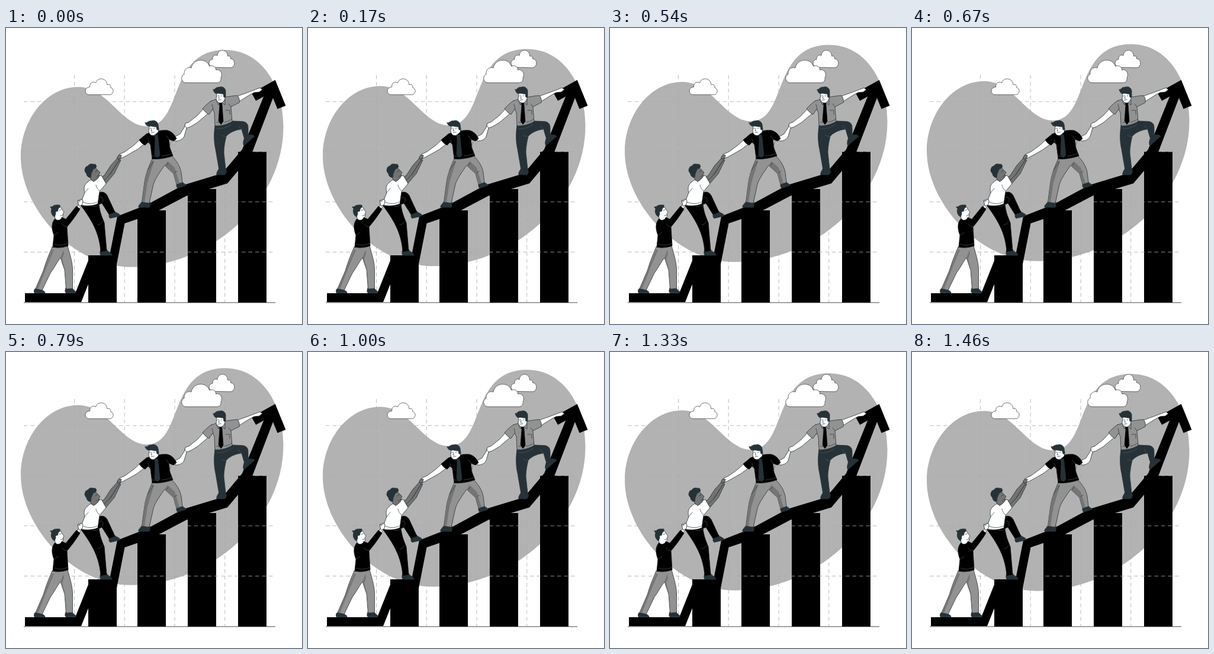
These frames come from a looping animation (500 by 500 pixels, 1500 ms). An HTML page:

```html
<!DOCTYPE html>
<html lang="en">
<head>
<meta charset="utf-8">
<title>Climbing the growth chart</title>
<style>
html, body { margin: 0; width: 100%; height: 100%; overflow: hidden; background: #fff; }
svg { display: block; width: 100vw; height: 100vh; }
.person path { stroke: #263238; stroke-width: .8; stroke-linejoin: round; stroke-linecap: round; }
.person .skin { fill: #fff; }
.person .tan { fill: #737373; }
.person .black { fill: #000; stroke: #111; }
.person .gray { fill: #929292; }
.person .shade { fill: #757575; stroke: none; }
.person .navy { fill: #263238; }
.person .line { fill: none; stroke-width: .7; }
.person .fold { fill: none; stroke: #596268; stroke-width: .6; }
.cloud path { fill: #fff; stroke: #333; stroke-width: .7; }
.grid { fill: none; stroke: #aaa; stroke-width: .8; stroke-dasharray: 6.5 5; }
.head { fill: none; stroke: #000; stroke-width: 15; stroke-miterlimit: 8; }
</style>
</head>
<body>
<svg viewBox="0 0 500 500" xmlns="http://www.w3.org/2000/svg">
  <path id="blob" fill="#b2b2b2" d="M25 215C26 155 68 99.500 122 99.500C172 99.500 195 166 238 166C300 166 272 37 370 37C430 37 468 95 468.500 165C470 294 345 403.700 212 403.700C110 403.700 23 300 25 215Z"/>

  <!-- chart -->
  <path d="M139 384H187V464H139ZM222 308H270V464H222ZM307 272H355V464H307ZM392 209H440V464H392Z"/>
  <path class="grid" d="M30 124.300H455M30 209H455M30 293.700H455M30 378.500H455M115.500 79.500V463M200.200 79.500V463M285 79.500V463M369.700 79.500V463"/>
  <path d="M30 463.900H455" stroke="#333" stroke-width=".9"/>
  <path d="M32 448H117L142.500 384H175L188 318L238 298.500L299 265.500L365 245.500L399 205L442 99L456 105L414 215L374 262.500L305 283.500L246 314.500L200.500 330L187 399H152.500L127 463H32Z"/>
  <path class="head" d="M418.500 116.500L451 98.500L465.500 134"/>

  <g class="cloud">
    <path d="M350 66.500C341 65 341 54 349 53C348 48 353 44 357 46.500C358 34.500 374 34.500 374.500 47.500C378 46.500 380 49 379.500 52C388 52 388 67 379 67Z"/>
    <path d="M303 92.500C295 91 295 80 301 78C300 70 307 65 313 67.500C316 51 339 50 343.500 64.500C350 62 355 66 354.500 71C362 68 367 78 363 84C364 90 360 92.500 356 92.500Z"/>
    <path transform="translate(.7 .7)" d="M140 112C131 112 131 99 141 99C140 92 146 89 151 92C153 82 170 83 170 95C175 94 177 97 176 100C182 101 182 111 175 112Z"/>
  </g>

  <!-- lowest climber -->
  <g class="person">
    <path class="navy" d="M50 440C47 441 47 445 48 447.500H66C66 444 61 444 60 441Z"/>
    <path class="navy" d="M101 439C100 442 99 445 101 447.500H118C119 444 113 443 112 439Z"/>
    <path class="gray" d="M78 370L104 368C108 382 112 395 112.500 407L112.500 440L101.500 441L99 409L92 388C86 396 81 406 75 414L61 443L50 440L63 410C67 397 72 383 78 370Z"/>
    <path class="shade" d="M92 388L97 375L98 381L95 390L100 409L102 439L99 409Z"/>
    <path class="shade" d="M78 374L81 375L69 403L54 441L50 440L63 410Z"/>
    <path class="skin" d="M119 304L123 297L121 292C123 289 125 291 126 293L129 288C131 289 130 294 130 297L123 306Z"/>
    <path class="black" d="M83 322C87 318 94 319 101 323L119 301L125 306C118 317 110 328 103 336L105 368C96 371 87 372 79 370L81 350C77 340 76 329 83 322Z"/>
    <path class="fold" d="M103 335C99 336 97 334 95 331M82 350L88 345M82 365C90 368 97 367 104 364"/>
    <path class="skin" d="M82 313L83 322C87 327 93 324 94 320C97 320 97 317 96 314L98 311L95 307L92 302H85Z"/>
    <path class="navy" d="M75 302L78 302C81 298 87 299 91 299L91 303C88 304 88 307 87 310C85 309 83 310 84 314L82 319C77 317 75 309 77 306Z"/>
    <path class="line" d="M90 308L93 307M92 317L96 316"/>
  </g>

  <!-- second climber -->
  <g class="person">
    <path class="navy" d="M160 375C158 378 159 382 160 384H179C179 379 172 379 170 374Z"/>
    <path class="navy" d="M175 313C173 317 174 320 176 321.500C182 320 188 319 193 317C192 313 186 313 183 309Z"/>
    <path class="black" d="M133 296L154 281C159 275 167 276 171 283L184 311L174 315L162 296L153 300Z"/>
    <path class="black" d="M126 299L157 297C158 310 162 319 166 329L170 376L160 378C158 345 143 322 126 299Z"/>
    <path class="fold" d="M157 298C153 302 149 302 145 301M158 286C163 284 166 289 163 294M155 332C158 333 161 330 163 327"/>
    <path class="tan" d="M158 254L166 249L177 232L187 221L190 216L195 213L195 219L190 225L181 239L168 258L162 263Z"/>
    <path class="tan" d="M161 262L176 247L190 225L194 223L183 246L165 267Z"/>
    <path class="skin" d="M137 261C142 256 149 253 157 250L161 249L169 263L164 269L158 276L155 297C146 301 135 301 125 299L133 278C131 271 132 265 137 261Z"/>
    <path class="line" d="M145 255L148 260L156 253M158 275C155 273 152 268 152 265M133 278L139 271M130 294C139 298 148 297 154 294"/>
    <path class="tan" d="M141 248L144 257C149 260 153 257 154 254C157 253 158 250 157 247L159 244L155 240L151 236L143 240Z"/>
    <path class="navy" d="M134 237C134 233 139 234 140 231C144 228 148 231 151 230L153 234C152 237 149 237 147 239L145 244L144 246L143 253C138 252 136 249 136 246C133 243 132 240 134 237Z"/>
    <path class="line" d="M151 243L154 241M153 251L157 249"/>
    <path class="skin" d="M122 296L121.500 291L124.500 293L126 289L130 291L129 298L124 301Z"/>
  </g>

  <!-- third climber -->
  <g class="person">
    <path class="navy" d="M230 293C227 297 223 300 224 303H242C244 301 243 297 243 294Z"/>
    <path class="navy" d="M289 261C287 265 288 269 290 270.500L304 266C304 263 299 263 297 259Z"/>
    <path class="gray" d="M247 221L280 216C288 224 294 233 296 244L298 261L288 264L283 246L268 232C261 242 252 254 249 264L242 296L229.500 294L234 260C236 246 242 232 247 221Z"/>
    <path class="shade" d="M247 224L250 225L239 261L234 294L230 294L234 260C236 246 242 232 247 224Z"/>
    <path class="shade" d="M268 232L273 225L285 236L293 262L288 264L283 246Z"/>
    <path class="line" d="M249 225C246 232 242 235 239 240M271 232L274 228M285 244L289 242"/>
    <path class="skin" d="M228 187L216 198L201 209L192 213L189 217L191 221L197 219L208 213L222 205L235 195Z"/>
    <path class="skin" d="M283 185L294 179L301 168L303 162L308 160L309 165L305 169L301 183C299 188 293 191 287 191Z"/>
    <path class="black" d="M237 179C246 175 263 172 273 173C280 175 285 180 288 187L283 191L275 188L277 203L282 216C270 220 259 222 247 221L244 197L240 193L235 198C230 196 227 192 225 189C229 186 233 182 237 179Z"/>
    <path class="navy" d="M251 181L256 180L257 186L260 215L256 219L251 214L252 187Z"/>
    <path class="fold" d="M243 196L240 188M276 189L271 182M247 216L254 217M263 216C270 216 275 214 280 212M279 191L276 201"/>
    <path class="skin" d="M242 166L241 174C242 180 246 183 251 181L257 176L258 169L254 164H244Z"/>
    <path class="navy" d="M235 160C239 161 241 156 246 157C250 155 256 158 257 163L258 172L255 172L254 167C250 167 246 165 242 166C238 166 236 163 235 160Z"/>
    <path class="line" d="M243 170L245 169M249 170L251 169M246 170L245 174L247 174M245 177L250 176"/>
    <path class="tan" d="M188 218L191 214L195 215L194 219L190 222Z"/>
  </g>

  <!-- top climber -->
  <g class="person">
    <path class="navy" d="M360 237C358 241 355 244 356 248H369C373 246 373 242 371 237Z"/>
    <path class="navy" d="M404 181C402 188 399 195 402 199C408 193 414 188 420 183C418 179 411 182 408 179Z"/>
    <path class="navy" d="M353 165L381 157L401 158C408 160 409 164 409 169L409 183L402 185L398 171C388 172 378 176 372 183C369 195 368 204 368 211L371 238L360 240L354 205C351 192 351 178 353 165Z"/>
    <path class="fold" d="M372 183C370 184 367 183 364 181M356 170C362 171 375 168 380 163M398 171C396 170 394 168 393 165"/>
    <path class="skin" d="M335 135L323 148L309 159L303 161L302 165L305 169L311 167L323 160L342 144Z"/>
    <path class="skin" d="M391 115L408 109L421 104L429 101L433 104L428 108L419 109L410 114L394 124Z"/>
    <path class="gray" d="M347 123C359 119 376 115 391 114C394 118 395 122 394 126L380 133L382 158C373 163 363 166 353 165L352 143L349 137L343 146C338 144 335 140 332 136C337 131 342 126 347 123Z"/>
    <path class="line" d="M350 137L348 129M380 133L376 128M355 122L359 130L364 126L370 130L370 120M356 159L360 160M369 159C374 158 377 157 381 154M371 139H378V146"/>
    <path class="black" d="M360 126L364 125L365 130L367 158L363 163L359 157L361 131Z"/>
    <path class="skin" d="M356 110L355 120C356 125 361 128 365 126C370 123 371 116 370 110L364 108Z"/>
    <path class="navy" d="M350 104C353 105 354 99 360 100C366 97 372 103 371 108L371 117L368 117L367 111C363 112 359 109 355 111C352 110 351 107 350 104Z"/>
    <path class="line" d="M357 115L359 114M363 115L365 114M360 115L359 119L361 119M358 122L363 121"/>
  </g>
</svg>
<script>
const LOOP = 1500, RISE = 10, LEAD = 20;
const blob = document.getElementById('blob');

function draw(now) {
  const phase = (now + LEAD) % LOOP / LOOP;
  const y = -RISE * (1 - Math.cos(2 * Math.PI * phase)) / 2;
  blob.setAttribute('transform', `translate(0 ${y.toFixed(2)})`);
}

const start = performance.now();
function tick() {
  draw(performance.now() - start);
  requestAnimationFrame(tick);
}
tick();
</script>
</body>
</html>
```
